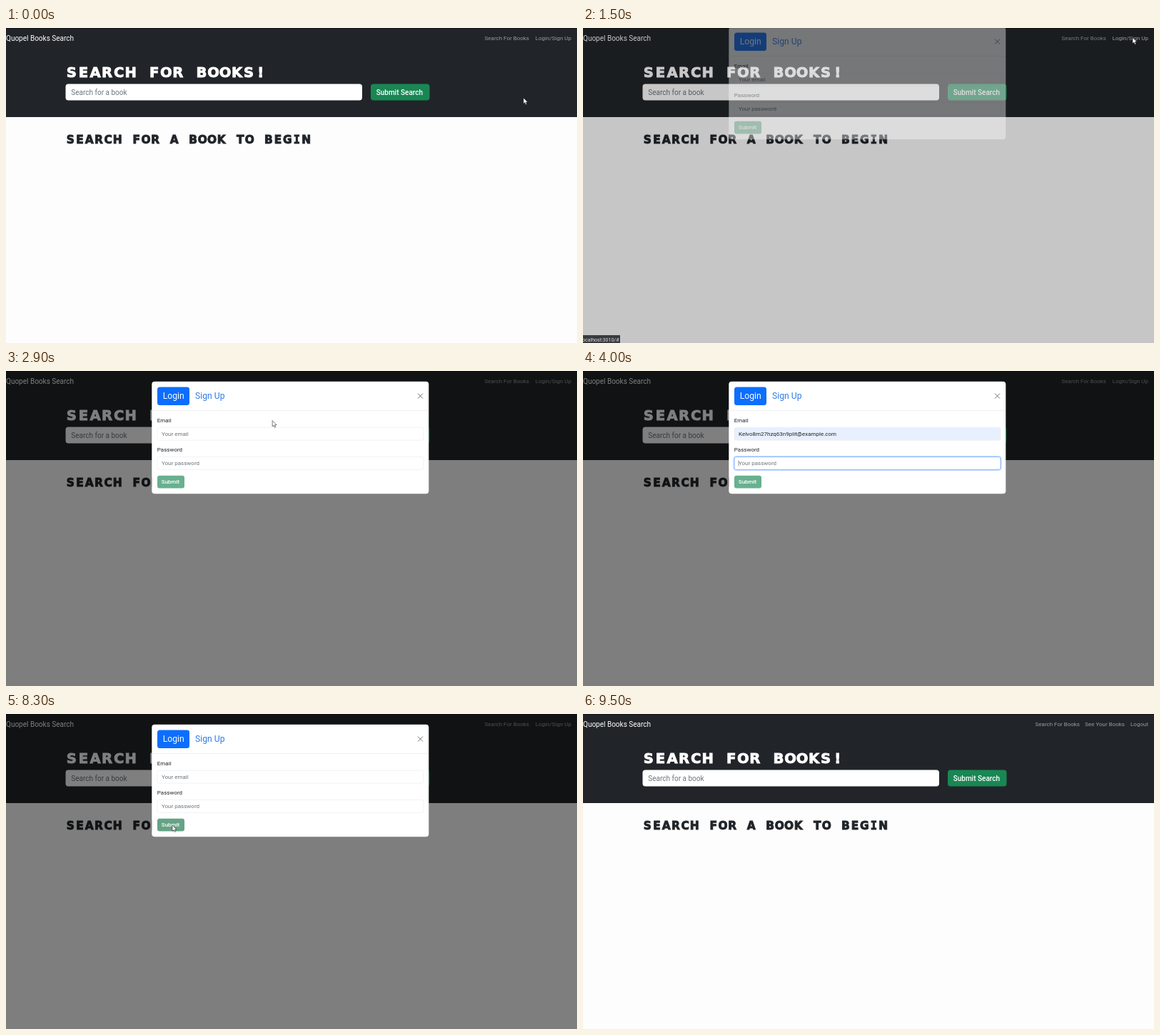
An HTML page for the animation above (9.8 s loop, 800 by 442 pixels).

```html
<!DOCTYPE html>
<html lang="en">
<head>
<meta charset="utf-8">
<title>Book search login</title>
<style>
  html, body { margin: 0; width: 100%; height: 100%; overflow: hidden; background: #fefdfe; }
  svg { display: block; width: 800px; height: 442px; font-family: Roboto, Inter, sans-serif; font-size: 8px; }
  .display text { font-family: "DejaVu Sans", sans-serif; font-weight: 700; text-anchor: middle; stroke-width: .9; }
  .display text.slab { font-family: "DejaVu Sans Mono", monospace; }
  .nav text { fill: #fff; fill-opacity: .55; text-anchor: end; }
  .medium { font-weight: 500; }
  .hint { fill: #6c757d; }
  .ink { fill: #212529; }
  .white { fill: #fff; }
</style>
</head>
<body>
<svg viewBox="0 0 800 442">
  <rect width="800" height="442" fill="#fefdfe"/>
  <rect width="800" height="125" fill="#212529"/>
  <rect width="800" height="1" fill="#111315"/>
  <text x="0" y="18" font-size="10" class="white">Quopel Books Search</text>
  <g class="nav" id="guestNav">
    <text x="733" y="17.4">Search For Books</text>
    <text x="792" y="17.4" id="loginLink">Login/Sign Up</text>
  </g>
  <g class="nav" id="userNav">
    <text x="696" y="17.4">Search For Books</text>
    <text x="759" y="17.4">See Your Books</text>
    <text x="792" y="17.4">Logout</text>
  </g>
  <g class="display" id="title" fill="#fff" stroke="#fff" font-size="19.6"></g>
  <rect x="83.5" y="78.5" width="415.5" height="23" rx="4" fill="#fff"/>
  <text x="91.3" y="93.5" font-size="10" class="hint">Search for a book</text>
  <rect x="511" y="78.5" width="82.5" height="23" rx="4" fill="#198754"/>
  <text x="518.7" y="93.5" font-size="10" class="white medium">Submit Search</text>
  <g class="display" id="subtitle" fill="#212529" stroke="#212529" font-size="15.4"></g>

  <rect id="backdrop" width="800" height="442"/>
  <g id="status">
    <rect y="431" width="52" height="11" fill="#3a3b3e"/>
    <text x="-1" y="439.5" font-size="7" fill="#dcdcde">ocalhost:3010/#</text>
  </g>

  <g id="modal">
    <rect x="204.3" y="14.7" width="388" height="157.6" rx="4" fill="#fff"/>
    <rect x="212" y="22.5" width="45" height="25.5" rx="3.5" fill="#0d6efd"/>
    <text x="219.7" y="39.2" font-size="12.2" class="white">Login</text>
    <text x="265" y="39.2" font-size="12.2" fill="#2f7be8">Sign Up</text>
    <path d="M577 31.6l7 7m0-7l-7 7" stroke="#707274" fill="none"/>
    <path d="M204.5 55.5h387.5" stroke="#eef0f2"/>
    <text x="211.8" y="72" class="ink">Email</text>
    <rect id="emailBox" x="212" y="79.2" width="373" height="18" rx="2.5"/>
    <text id="emailText" x="218" y="91"></text>
    <text x="211.8" y="113.4" class="ink">Password</text>
    <rect id="passBox" x="212" y="120.5" width="373" height="18" rx="2.5"/>
    <text id="passHint" x="218" y="132.3" class="hint">Your password</text>
    <g id="dots" fill="#212529"></g>
    <rect id="caret" width=".6" height="8" fill="#555"/>
    <g id="submit">
      <rect id="submitBox" x="212" y="146.8" width="38" height="17.6" rx="3"/>
      <text x="217.8" y="158.4" class="white medium">Submit</text>
    </g>
  </g>
  <path id="cursor" d="M0 0v8.3l1.9-1.7 1.3 3 1.5-.7-1.3-2.8h2.6z" fill="#fff" stroke="#222" stroke-width=".6"/>
</svg>
<script>
const LOOP = 9800, STEP = 100;
const SVG_NS = "http://www.w3.org/2000/svg";
const EMAIL = "Kelvo8m27hzq63n9plit@example.com";
const KEY_TIMES = [4500, 4900, 5200, 5400, 5500, 6100, 6600, 6700, 6800, 6900];
// time, x, y of the pointer
const ENTER = [[0, 725, 98], [1000, 770, 13.5], [1700, 770, 13.5], [2400, 596, 34], [3200, 270, 86], [3900, 260, 126]];
const RETURN = [[7400, 330, 110], [8000, 233, 156]];

const el = Object.fromEntries([...document.querySelectorAll("[id]")].map(node => [node.id, node]));

function add(parent, tag, attrs) {
  const node = document.createElementNS(SVG_NS, tag);
  set(node, attrs);
  return parent.appendChild(node);
}
function set(node, attrs) {
  for (const key in attrs) node.setAttribute(key, attrs[key]);
}
function show(node, visible) {
  node.style.display = visible ? "" : "none";
}

// Evenly pitched heading letters
function spell(group, words, pitch, y) {
  [...words].forEach((letter, i) => {
    if (letter === " ") return;
    const attrs = { x: 83.6 + pitch * (i + .5), y };
    if (letter === "I") attrs.class = "slab";
    add(group, "text", attrs).textContent = letter;
  });
}

function along(keys, t) {
  const next = keys.findIndex(key => key[0] > t);
  if (next < 0) return keys[keys.length - 1].slice(1);
  if (next === 0) return keys[0].slice(1);
  const [t0, x0, y0] = keys[next - 1], [t1, x1, y1] = keys[next];
  const p = (t - t0) / (t1 - t0), ease = p * p * (3 - 2 * p);
  return [x0 + (x1 - x0) * ease, y0 + (y1 - y0) * ease];
}

function styleInput(box, focused, fill) {
  set(box, {
    fill,
    stroke: focused ? "#86b7fe" : "#eceef1",
    "stroke-width": focused ? 1 : .7
  });
  box.style.filter = focused ? "drop-shadow(0 0 1.2px rgba(13,110,253,.6))" : "none";
}

function drawForm(t) {
  const filled = t >= 3600 && t < 8300;
  const emailFocus = t >= 3200 && t < 3900;
  const passFocus = t >= 3900 && t < 8000;
  const typed = t < 8300 ? KEY_TIMES.filter(time => time <= t).length : 0;

  styleInput(el.emailBox, emailFocus, filled ? "#e8f0fe" : "#fff");
  el.emailText.textContent = filled ? EMAIL : "Your email";
  set(el.emailText, { class: filled ? "ink" : "hint" });

  styleInput(el.passBox, passFocus, "#fff");
  show(el.passHint, typed === 0);
  [...el.dots.children].forEach((dot, i) => show(dot, i < typed));
  show(el.caret, passFocus || emailFocus && !filled);
  set(el.caret, { x: 217.7 + typed * 3.05, y: passFocus ? 125.5 : 84.2 });

  set(el.submit, { opacity: typed ? 1 : .65 });
  set(el.submitBox, { fill: t >= 7900 ? "#157347" : "#198754" });
}

function draw(time) {
  const t = Math.floor(time % LOOP / STEP) * STEP;
  const open = t >= 1500 && t < 8400;
  const opening = t === 1500;

  show(el.guestNav, t < 8400);
  show(el.userNav, t >= 8400);
  set(el.loginLink, { "fill-opacity": t >= 900 && t < 1800 ? .75 : .55 });
  el.loginLink.style.fillOpacity = t >= 900 && t < 1800 ? .75 : .55;

  show(el.backdrop, open);
  set(el.backdrop, { opacity: opening ? .22 : .5 });
  show(el.status, t >= 1100 && t <= 1600);
  set(el.status, { opacity: t === 1600 ? .12 : 1 });

  show(el.modal, open);
  const lift = opening ? -16 : t === 1600 ? -6.3 : 0;
  set(el.modal, { opacity: opening ? .4 : 1, transform: `translate(0 ${lift})` });
  if (open) drawForm(t);

  const [x, y] = along(t < 7400 ? ENTER : RETURN, t);
  show(el.cursor, t < 3900 || t >= 7400 && t < 8400);
  set(el.cursor, { transform: `translate(${x} ${y})` });
}

spell(el.title, "SEARCH FOR BOOKS!", 16.55, 69.3);
spell(el.subtitle, "SEARCH FOR A BOOK TO BEGIN", 13.22, 162);
KEY_TIMES.forEach((_, i) => add(el.dots, "circle", { cx: 219.5 + i * 3.05, cy: 129.5, r: .85 }));

const start = performance.now();
function frame() {
  draw(performance.now() - start);
  requestAnimationFrame(frame);
}
frame();
</script>
</body>
</html>
```
